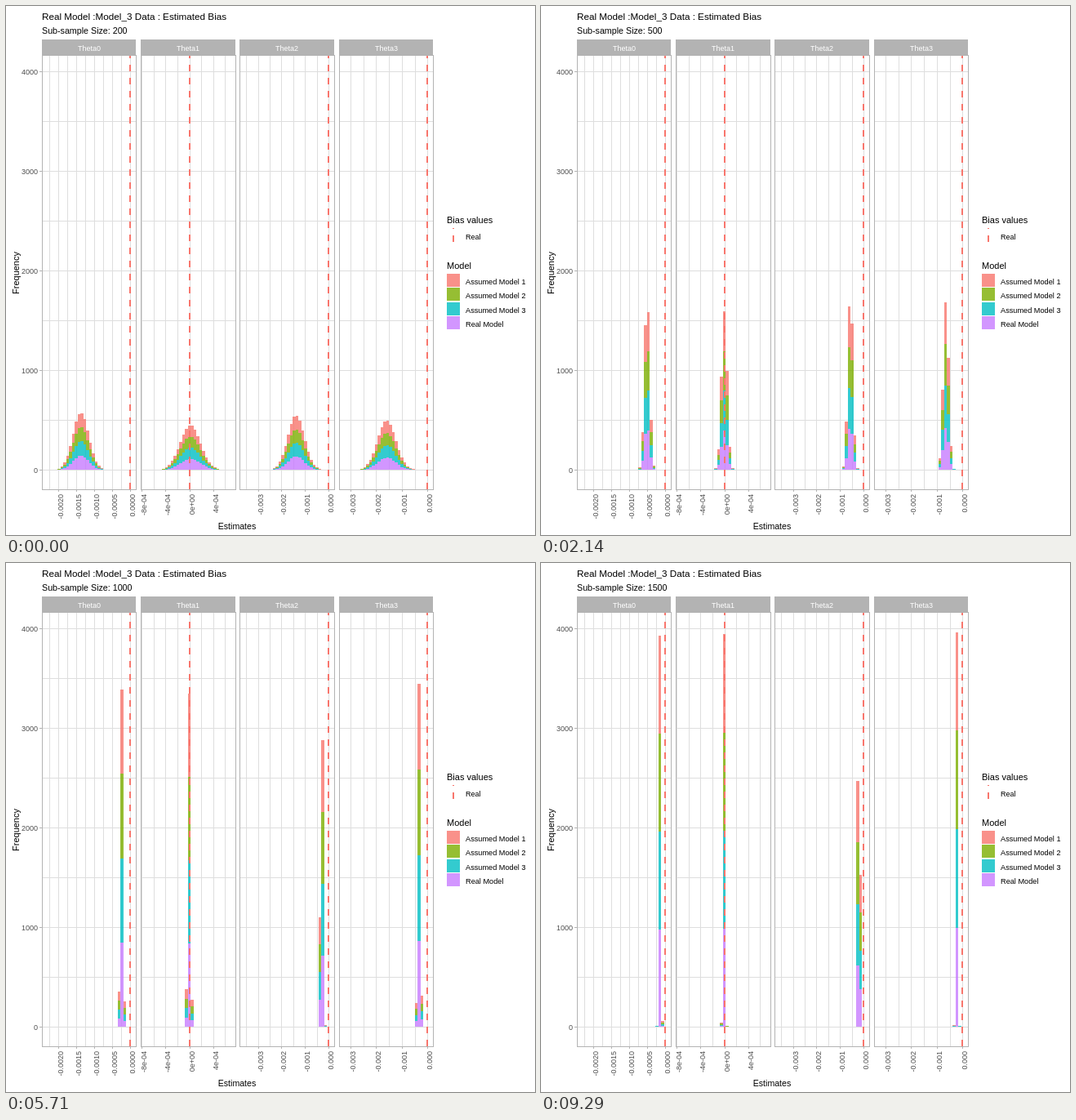
Animation of 648 by 648 pixels, one loop 10000 ms. Source, as an HTML page:

```html
<!DOCTYPE html>
<html lang="en">
<head>
<meta charset="utf-8">
<title>Estimated Bias</title>
<style>
  html, body { margin: 0; width: 100%; height: 100%; overflow: hidden; background: #fff; }
  svg { display: block; font: 9px "Liberation Sans", Arial, sans-serif; }
  .shape { shape-rendering: crispEdges; }
</style>
</head>
<body>
<svg id="stage" width="648" height="648" viewBox="0 0 648 648"></svg>
<script>
const NS = 'http://www.w3.org/2000/svg';
const stage = document.getElementById('stage');
const GRID = '#dedede', FRAME = '#b3b3b3', TICK_TEXT = '#4d4d4d', LINE = '#f8766d';
const MODELS = [
  ['Assumed Model 1', '#f8766d'], ['Assumed Model 2', '#7cae00'],
  ['Assumed Model 3', '#00bfc4'], ['Real Model', '#c77cff']
];
const BIN = 3.49, TOTAL = 4000, LOOP = 10000, STEPS = 14;
const TOP = 60, BOTTOM = 592;
const yOf = count => 568.4 - count * 0.122;
const sizeAt = step => 200 + 100 * step;

// A value that shrinks as a power of the sub-sample size, starting at size 200.
const decay = (start, power, limit = 0) => size => limit + start * (200 / size) ** power;

// zero: x of bias 0; step, first, last: vertical grid; mean, spread: in bins.
const PANELS = [
  { left: 44, width: 115, zero: 152.8, step: 11, first: -9, last: 0,
    label: k => (k * 0.00025).toFixed(4),
    mean: decay(-17.37, 1.085), spread: decay(2.75, 1.285) },
  { left: 165, width: 116, zero: 225, step: 14.65, first: -4, last: 3,
    label: k => k ? `${2 * k}e-04` : '0e+00',
    mean: decay(0.455, 1.8, -0.055), spread: decay(3.55, 1.427) },
  { left: 286, width: 116, zero: 395.5, step: 14.4, first: -7, last: 0,
    label: k => (k * 0.0005).toFixed(3),
    mean: decay(-11.3, 0.985), spread: decay(2.9, 1.387) },
  { left: 408, width: 115, zero: 516.8, step: 15.72, first: -6, last: 0,
    label: k => (k * 0.0005).toFixed(3),
    mean: decay(-14.3, 0.975), spread: decay(3.2, 1.4) }
];

function add(parent, tag, attrs, content) {
  const el = document.createElementNS(NS, tag);
  for (const key in attrs) el.setAttribute(key, attrs[key]);
  if (content !== undefined) el.textContent = content;
  parent.appendChild(el);
  return el;
}
const rect = (parent, x, y, width, height, fill, extra) =>
  add(parent, 'rect', { x, y, width, height, fill, class: 'shape', ...extra });
const text = (x, y, content, extra) => add(stage, 'text', { x, y, ...extra }, content);
const dashed = (x, from, to) => add(stage, 'path', {
  d: `M${x} ${from}V${to}`, stroke: LINE, 'stroke-width': 2, 'stroke-dasharray': '8 8', class: 'shape'
});

const normalCdf = z => 1 / (1 + Math.exp(-1.5976 * z - 0.07056 * z ** 3));

// Stacked histogram of a normal sample, shared equally by the four models.
function drawBars(group, panel, size) {
  const mean = panel.mean(size), spread = panel.spread(size);
  const below = k => normalCdf((k - 0.5 - mean) / spread);
  const edge = k => Math.floor(panel.zero + (k - 0.5) * BIN);
  for (let k = Math.floor(mean - 4 * spread); k <= Math.ceil(mean + 4 * spread); k++) {
    const count = TOTAL * (below(k + 1) - below(k));
    MODELS.forEach(([, color], m) => {
      const y = Math.round(yOf(count * (4 - m) / 4));
      const base = Math.round(yOf(count * (3 - m) / 4));
      if (base > y) rect(group, edge(k), y, edge(k + 1) - edge(k), base - y, color);
    });
  }
}

// Headings and axis titles
text(44, 17, 'Real Model :Model_3 Data : Estimated Bias', { 'font-size': 11.7 });
const subtitle = text(44, 34, '', { 'font-size': 10.7 });
text(283, 641, 'Estimates', { 'font-size': 10.6, 'text-anchor': 'middle' });
text(0, 0, 'Frequency', {
  'font-size': 11, 'text-anchor': 'middle', transform: 'translate(15.5 327) rotate(-90)'
});

// Grid, ticks and strips
PANELS.forEach((p, i) => {
  for (let count = 0; count <= 4000; count += 500)
    rect(stage, p.left, Math.floor(yOf(count)), p.width, 1, GRID);
  for (let k = p.first; k <= p.last; k++) {
    const x = Math.floor(p.zero + k * p.step);
    rect(stage, x, TOP, 1, BOTTOM - TOP, GRID);
    if (k % 2) continue;
    rect(stage, x, BOTTOM, 1, 3, FRAME);
    text(0, 0, p.label(k), {
      fill: TICK_TEXT, 'text-anchor': 'end', transform: `translate(${x + 6} 598) rotate(-90)`
    });
  }
  rect(stage, p.left, 41, p.width, 19, FRAME);
  text(p.left + 58, 55, 'Theta' + i, { fill: '#fff', 'text-anchor': 'middle' });
});
for (let count = 0; count <= 4000; count += 1000) {
  const y = Math.floor(yOf(count));
  rect(stage, 41, y, 3, 1, FRAME);
  text(39, y + 4, count, { fill: TICK_TEXT, 'text-anchor': 'end' });
}

const states = Array.from({ length: STEPS }, (_, i) => {
  const group = add(stage, 'g', { 'fill-opacity': 0.8, display: 'none' });
  PANELS.forEach(p => drawBars(group, p, sizeAt(i)));
  return group;
});

PANELS.forEach(p => {
  dashed(Math.floor(p.zero), BOTTOM, TOP);
  rect(stage, p.left + 0.5, TOP + 0.5, p.width, BOTTOM - TOP, 'none', { stroke: FRAME });
});

// Legend
text(540, 266, 'Bias values', { 'font-size': 11 });
dashed(548, 289, 272);
text(563, 286, 'Real');
text(540, 322, 'Model', { 'font-size': 11 });
MODELS.forEach(([name, color], i) => {
  const y = Math.round(328 + 17.28 * i);
  rect(stage, 540, y, 16, 16, color, { 'fill-opacity': 0.8 });
  text(563, y + 13, name, { 'font-size': 9.2 });
});

const starts = states.map((_, i) => Math.round(i * LOOP / STEPS / 10) * 10);
let shown = -1;
function tick() {
  const t = performance.now() % LOOP;
  const index = starts.filter(s => s <= t).length - 1;
  if (index !== shown) {
    states.forEach((g, i) => g.setAttribute('display', i === index ? 'inline' : 'none'));
    subtitle.textContent = 'Sub-sample Size: ' + sizeAt(index);
    shown = index;
  }
  requestAnimationFrame(tick);
}
tick();
</script>
</body>
</html>
```
